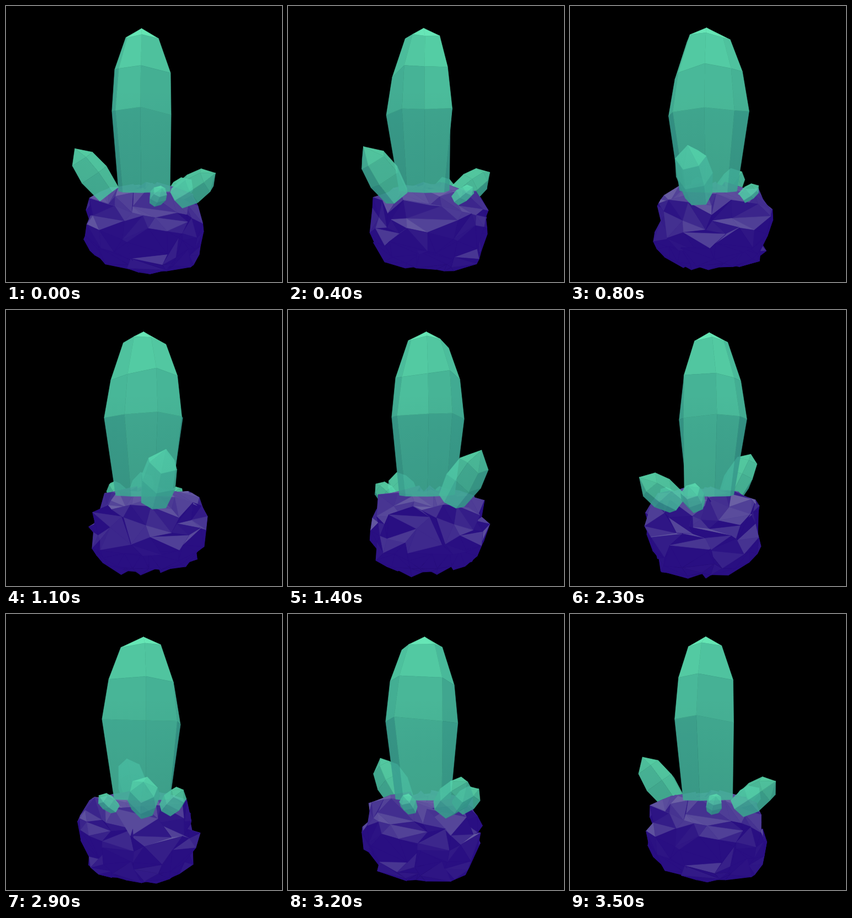
Recreate the animation shown at these times as an HTML page with a canvas. Size 500 by 500 pixels, loop 3600 ms.

```html
<!DOCTYPE html>
<html lang="en">
<head>
<meta charset="utf-8">
<title>Crystal</title>
<style>
html, body { margin: 0; width: 100%; height: 100%; overflow: hidden; background: #000; }
canvas { display: block; }
</style>
</head>
<body>
<canvas id="stage" width="500" height="500"></canvas>
<script>
const LOOP = 3600, STEP = 100, SIZE = 500;
const CX = 249, HORIZON = 290, DIST = 800, RAD = Math.PI / 180;

const ctx = document.getElementById('stage').getContext('2d');
const layer = document.createElement('canvas');
layer.width = layer.height = SIZE;
const lctx = layer.getContext('2d');

let seed = 11;
const rnd = () => (seed = (seed * 16807) % 2147483647) / 2147483647;
const jitter = n => (rnd() * 2 - 1) * n;

// Vectors: x right, y down from the horizon, z towards the viewer.
const sub = (a, b) => a.map((v, i) => v - b[i]);
const dot = (a, b) => a[0] * b[0] + a[1] * b[1] + a[2] * b[2];
const cross = (a, b) => [
  a[1] * b[2] - a[2] * b[1],
  a[2] * b[0] - a[0] * b[2],
  a[0] * b[1] - a[1] * b[0]
];
const unit = a => { const l = Math.hypot(...a) || 1; return a.map(v => v / l); };
const mean = pts => [0, 1, 2].map(i => pts.reduce((s, p) => s + p[i], 0) / pts.length);
const polar = (deg, r, y) => [r * Math.cos(deg * RAD), y, r * Math.sin(deg * RAD)];

function spin(p, turn) {
  const c = Math.cos(turn), s = Math.sin(turn);
  return [p[0] * c + p[2] * s, p[1], p[2] * c - p[0] * s];
}

function project(p) {
  const k = DIST / (DIST - p[2]);
  return [CX + p[0] * k, HORIZON + p[1] * k];
}

// Each face carries its corners and its outward normal.
function face(pts, core) {
  const [a, b, c, d] = pts;
  let n = unit(d ? cross(sub(c, a), sub(d, b)) : cross(sub(b, a), sub(c, a)));
  if (dot(n, sub(mean(pts), core)) < 0) n = n.map(v => -v);
  return { pts, n, tint: jitter(1) };
}

function skin(tip, rings, core) {
  const n = rings[0].length, faces = [];
  for (let i = 0; i < n; i++) {
    const j = (i + 1) % n;
    faces.push(face([tip, rings[0][i], rings[0][j]], core));
    for (let k = 1; k < rings.length; k++) {
      faces.push(face([rings[k - 1][i], rings[k - 1][j], rings[k][j], rings[k][i]], core));
    }
  }
  return faces;
}

function bigCrystal() {
  const angles = [15, 94, 131, 175, 226, 271, 305];
  const rings = [
    { r: [28, 42, 43, 32, 37, 38, 32], y: [-229, -226, -223, -232, -232, -227, -232] },
    { r: [50, 64, 64, 52, 61, 61, 55], y: [-166, -168, -166, -174, -162, -159, -164] },
    { r: [51, 76, 72, 57, 72, 73, 62], y: [-91, -97, -94, -99, -93, -92, -94] },
    { r: [49, 54, 54, 45, 48, 52, 48], y: Array(7).fill(45) }
  ].map(({ r, y }) => angles.map((deg, i) => polar(deg, r[i], y[i])));
  return skin(polar(200, 3.5, -249.5), rings, [0, -100, 0]);
}

function smallCrystal(deg, base, tip, width) {
  const a = polar(deg, ...base), b = polar(deg, ...tip);
  const axis = unit(sub(a, b));
  const side = polar(deg + 90, 1, 0);
  const up = cross(axis, side);
  const wobble = Array.from({ length: 6 }, () => [jitter(12), 1 + jitter(0.08), jitter(0.05)]);
  const rings = [[0.25, 0.82], [0.58, 1], [0.97, 0.78]].map(([t, w]) =>
    wobble.map(([da, k, dt], i) => {
      const q = (i * 60 + 20 + da) * RAD, r = width * w * k, f = t + (t < 0.9 ? dt : 0);
      return [0, 1, 2].map(c => b[c] + (a[c] - b[c]) * f
        + r * (Math.cos(q) * side[c] + Math.sin(q) * up[c]));
    }));
  return { deg, faces: skin(b, rings, mean([a, b])) };
}

// Strong jitter folds the mesh over itself into loose shards.
function rockMesh() {
  const profile = [[22, 35], [62, 42], [84, 52], [95, 68], [100, 88], [101, 108],
    [98, 129], [93, 149], [82, 166], [52, 177]];
  const cols = 18, faces = [], core = [1, 110, 10];
  const rows = profile.map(([r, y], i) => Array.from({ length: cols }, (_, j) => {
    const deg = (j + (i % 2) / 2 + jitter(0.75)) * 360 / cols;
    const sag = y > 110 ? 5 * Math.cos((deg - 330) * RAD) : 0;
    const rough = i < 2 || i > 7 ? 6 : 15;
    const p = polar(deg, r * (1 + jitter(0.11)), y + sag + jitter(rough));
    return [p[0] + core[0], p[1], p[2] + core[2]];
  }));
  for (let i = 1; i < rows.length; i++) {
    for (let j = 0; j < cols; j++) {
      const k = (j + 1) % cols;
      const [a, b, c, d] = [rows[i - 1][j], rows[i - 1][k], rows[i][k], rows[i][j]];
      const tris = i % 2 ? [[a, b, d], [b, c, d]] : [[a, b, c], [a, c, d]];
      tris.forEach(t => faces.push(face(t, core)));
    }
  }
  return faces;
}

const big = bigCrystal();
const rock = rockMesh();
const shoots = [
  smallCrystal(184, [60, 54], [126, -32], 30),
  smallCrystal(20, [60, 57], [131, 12], 27),
  smallCrystal(72, [62, 60], [95, 36], 14),
  smallCrystal(-22, [58, 60], [98, 26], 20)
];

const rgb = c => `rgb(${c.map(v => Math.round(Math.min(255, Math.max(0, v)))).join()})`;

const green = (base, rise) => n => {
  const g = base - rise * n[1] + 27 * n[2];
  return rgb([48 + (g - 138) * 0.55, g, 128 + (g - 138) * 0.54].map(v => v / 0.9));
};
const bigPaint = green(151, 88), shootPaint = green(160, 42);

function indigo(n, tint, y) {
  const lit = Math.max(0, -0.9 * n[1] + 0.32 * n[2] + 0.1 * tint - 0.08);
  const fade = Math.max(0.35, 1 - Math.max(0, y - 90) / 150);
  const k = Math.pow(lit, 1.2) * fade;
  return rgb([41 + 72 * k, 15 + 90 * k, 130 + 38 * k]);
}

function drawMesh(g, faces, turn, paint, cull) {
  faces.map(f => {
    const pts = f.pts.map(p => spin(p, turn));
    return { pts, n: spin(f.n, turn), mid: mean(pts), tint: f.tint };
  }).filter(f => !cull || dot(f.n, sub([0, 0, DIST], f.mid)) > 0)
    .sort((a, b) => a.mid[2] - b.mid[2])
    .forEach(f => {
      g.beginPath();
      f.pts.forEach(p => g.lineTo(...project(p)));
      g.closePath();
      g.fillStyle = g.strokeStyle = paint(f.n, f.tint, f.mid[1]);
      g.fill();
      g.lineWidth = 0.6;
      g.lineJoin = 'round';
      g.stroke();
    });
}

const dusk = lctx.createLinearGradient(0, 150, 0, 345);
dusk.addColorStop(0, 'rgba(10,30,40,0)');
dusk.addColorStop(1, 'rgba(10,30,40,.07)');

// Crystals are see-through as a whole, so each is composed on its own layer.
function drawCrystal(faces, turn, paint) {
  lctx.clearRect(0, 0, SIZE, SIZE);
  drawMesh(lctx, faces, turn, paint, true);
  lctx.globalCompositeOperation = 'source-atop';
  lctx.fillStyle = dusk;
  lctx.fillRect(0, 0, SIZE, SIZE);
  lctx.globalCompositeOperation = 'source-over';
  ctx.globalAlpha = 0.9;
  ctx.drawImage(layer, 0, 0);
  ctx.globalAlpha = 1;
}

function draw(turn) {
  ctx.fillStyle = '#000';
  ctx.fillRect(0, 0, SIZE, SIZE);
  const depth = s => Math.sin(s.deg * RAD - turn);
  const order = [...shoots].sort((a, b) => depth(a) - depth(b));
  const isFront = s => depth(s) > -0.15;
  order.filter(s => !isFront(s)).forEach(s => drawCrystal(s.faces, turn, shootPaint));
  drawMesh(ctx, rock, turn, indigo, false);
  drawCrystal(big, turn, bigPaint);
  order.filter(isFront).forEach(s => drawCrystal(s.faces, turn, shootPaint));
}

const start = performance.now();
let shown = -1;
function tick() {
  const step = Math.floor(((performance.now() - start) % LOOP) / STEP);
  if (step !== shown) {
    shown = step;
    draw(step * STEP / LOOP * 2 * Math.PI);
  }
  requestAnimationFrame(tick);
}
tick();
</script>
</body>
</html>
```
